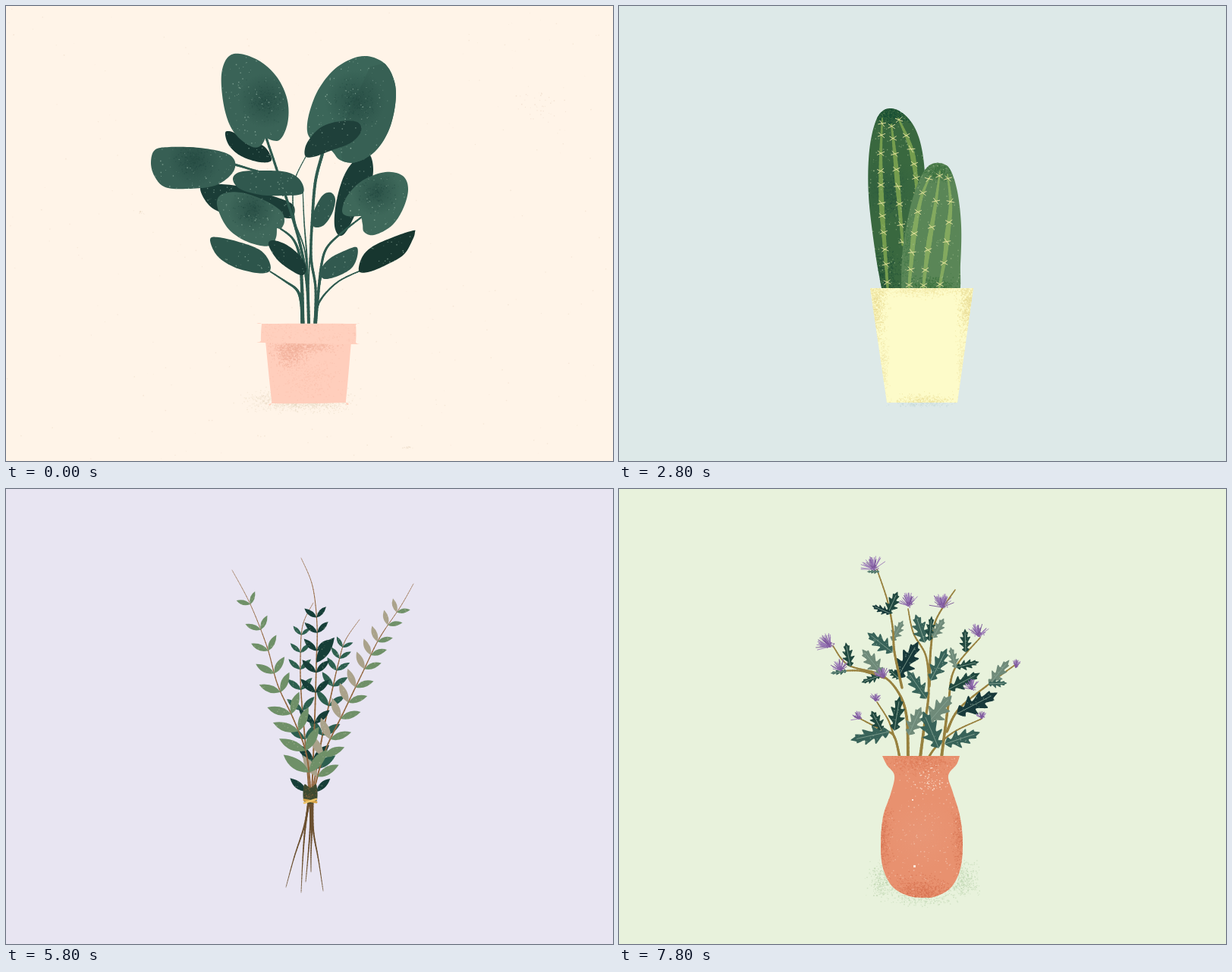
Write an HTML page with a canvas that moves like this. It is 800 by 600 pixels and loops after 8000 ms.

```html
<!DOCTYPE html>
<html lang="en">
<head>
<meta charset="utf-8">
<title>Potted plants</title>
<style>
html, body { margin: 0; width: 100%; height: 100%; overflow: hidden; }
canvas { display: block; }
</style>
</head>
<body>
<canvas id="stage" width="800" height="600"></canvas>
<script>
const ctx = document.getElementById('stage').getContext('2d');

let seed;
const rnd = () => {
  seed = (seed + 0x6D2B79F5) | 0;
  let t = Math.imul(seed ^ seed >>> 15, 1 | seed);
  t ^= t + Math.imul(t ^ t >>> 7, 61 | t);
  return ((t ^ t >>> 14) >>> 0) / 4294967296;
};
const bell = () => (rnd() + rnd() + rnd() - 1.5) / 1.5;
const mix = (a, b, t) => a + (b - a) * t;
const parse = s => s.split(' ').map(p => p.split(',').map(Number));

// Smooth curve through points; a doubled point makes a corner.
function trace(str, closed) {
  const p = parse(str), n = p.length, out = [];
  const at = i => closed ? p[(i + n) % n] : p[Math.max(0, Math.min(n - 1, i))];
  for (let i = 0; i < (closed ? n : n - 1); i++) {
    const [a, b, c, d] = [at(i - 1), at(i), at(i + 1), at(i + 2)];
    if (b[0] === c[0] && b[1] === c[1]) continue;
    for (let k = 0; k < 10; k++) {
      const t = k / 10;
      out.push([0, 1].map(j => b[j] + .5 * t * (c[j] - a[j] + t * (2 * a[j] - 5 * b[j] + 4 * c[j] - d[j]
        + t * (3 * (b[j] - c[j]) + d[j] - a[j])))));
    }
  }
  if (!closed) out.push(p[n - 1]);
  return out;
}

function fillPoly(pts, col) {
  ctx.beginPath();
  pts.forEach(q => ctx.lineTo(...q));
  ctx.closePath();
  ctx.fillStyle = col;
  ctx.fill();
}

function backdrop(col) {
  ctx.fillStyle = col;
  ctx.fillRect(0, 0, 800, 600);
}

function dot(x, y, s) { ctx.fillRect(x, y, s, s); }

function grain(x, y, rx, ry, n, col, alpha = .6) {
  ctx.globalAlpha = alpha;
  ctx.fillStyle = col;
  for (let i = 0; i < n; i++) dot(x + bell() * rx, y + bell() * ry, mix(.7, 1.5, rnd()));
  ctx.globalAlpha = 1;
}

function specks(x, y, w, h, n, col, alpha = .55) {
  ctx.globalAlpha = alpha;
  ctx.fillStyle = col;
  for (let i = 0; i < n; i++) dot(x + rnd() * w, y + rnd() * h, mix(.5, 1.6, rnd()));
  ctx.globalAlpha = 1;
}

function glow(x, y, r, col) {
  const g = ctx.createRadialGradient(x, y, 0, x, y, r);
  g.addColorStop(0, col);
  g.addColorStop(1, col + '00');
  ctx.globalAlpha = .55;
  ctx.fillStyle = g;
  ctx.fillRect(x - r, y - r, 2 * r, 2 * r);
  grain(x, y, r, r, r * 4, col, .35);
}

// Filled outline with speckles; inner() paints more inside it.
function shape(str, col, inner, light = '#a5c4b2', gap = 95) {
  const pts = trace(str, true), xs = pts.map(q => q[0]), ys = pts.map(q => q[1]);
  const x = Math.min(...xs), y = Math.min(...ys), w = Math.max(...xs) - x, h = Math.max(...ys) - y;
  fillPoly(pts, col);
  ctx.save();
  ctx.clip();
  if (inner) inner();
  if (light) specks(x, y, w, h, w * h / gap, light);
  ctx.restore();
}

function strokePts(pts, w0, w1, col) {
  ctx.strokeStyle = col;
  ctx.lineCap = 'round';
  for (let i = 1; i < pts.length; i++) {
    ctx.lineWidth = mix(w0, w1, i / pts.length);
    ctx.beginPath();
    ctx.moveTo(...pts[i - 1]);
    ctx.lineTo(...pts[i]);
    ctx.stroke();
  }
}
const stem = (str, w0, w1, col) => strokePts(trace(str), w0, w1, col);

function line(x1, y1, x2, y2, w, col) { strokePts([[x1, y1], [x2, y2]], w, w, col); }

function turn(deg, x, y, draw) {
  ctx.save();
  ctx.translate(x, y);
  ctx.rotate(deg * Math.PI / 180);
  ctx.translate(-x, -y);
  draw();
  ctx.restore();
}

function plant(k) {
  const green = '#2f5a4f', dark = '#1b3d37', deep = '#1c4039';
  const shade = (x, y, r) => () => glow(x, y, r, deep);
  backdrop('#fff4e8');
  specks(0, 0, 800, 600, 260, '#f3e3d2', .7);
  grain(700, 130, 45, 35, 40, '#eedccb', .7);
  grain(175, 272, 10, 5, 10, '#e8d5c2');
  grain(530, 582, 10, 3, 14, '#e8d5c2');
  grain(390, 520, 95, 20, 1500, '#e9dcc6', .5);

  shape('433,290 435,260 445,225 460,203 478,195 484,215 479,240 465,265 450,295 440,303', dark);
  shape('289,167 298,166 315,175 340,185 350,203 335,206 310,198 294,184', '#163631');
  shape('256,240 275,235 310,238 350,250 378,262 377,279 355,278 300,276 270,265', dark);
  stem('301,209 318,214 345,224 365,250', 3, 2, green);
  stem('343,174 360,225 378,280 390,325 397,370 399,419', 3, 4, green);
  stem('396,197 382,225 378,250 381,285 395,330 399,419', 1, 2, green);
  stem('417,195 408,230 404,275 402,330 408,372 407,419', 4, 3, green);
  stem('404,285 402,310 399,360 399,419', 1.5, 2, green);
  stem('391,240 393,285 397,340 399,419', 1, 2.5, green);
  stem('361,293 378,307 387,330 390,370 391,419', 2, 5, green);
  stem('348,350 368,363 383,374 389,390 391,419', 1.5, 5, green);
  stem('469,278 445,297 424,317 416,340 411,385 408,419', 2, 4, green);
  stem('416,355 412,375 408,405', 1.5, 2, green);

  shape('397,165 400,140 413,108 437,80 470,66 498,75 512,100 513,130 504,165 486,192 461,206 440,203 428,190 405,178',
    '#3b6659', () => {
      fillPoly(parse('480,80 520,70 520,210 445,215 438,170'), '#376054');
      glow(460, 125, 40, deep);
    });
  shape('394,197 397,180 415,160 440,152 463,153 468,165 455,180 430,190 405,199', '#1f403a');
  turn(-6 * k, 342, 174, () =>
    shape('342,174 342,174 360,177 371,155 371,125 358,95 335,73 308,63 292,68 284,90 286,125 294,155 307,174 325,186 336,184',
      '#3a6357', shade(342, 125, 36)));
  shape('191,207 196,190 215,186 255,187 290,194 302,206 297,222 275,237 240,241 210,239 196,225', '#375f54', shade(248, 203, 35));
  shape('299,228 308,219 335,217 370,219 388,230 391,247 365,250 335,249 308,241', '#30584e');
  shape('278,262 285,248 310,246 340,256 362,270 367,283 363,293 357,293 357,293 356,305 350,315 335,316 310,307 290,290',
    '#3e675a', shade(325, 268, 32));
  shape('269,308 280,305 310,312 335,322 347,337 347,350 330,352 300,344 278,329', '#2d554b');
  shape('346,315 352,309 370,315 388,330 396,345 391,355 378,350 358,335', dark);
  shape('404,288 406,270 417,250 428,246 434,255 430,273 420,288 410,292', '#30584e');
  shape('443,270 450,250 470,230 500,219 523,224 530,242 523,268 508,290 485,302 472,298 470,288 468,277 468,277 450,277',
    '#3e685a', shade(488, 245, 32));
  shape('415,356 416,345 428,332 448,322 462,318 463,330 456,345 440,355 422,360', '#31594f');
  turn(6 * k, 410, 395, () => {
    stem('467,349 440,362 421,379 410,395', 1.5, 2.5, green);
    shape('465,349 470,330 485,316 515,303 537,296 539,298 536,308 524,328 500,342 477,351', '#17362f');
  });
  stem('412,392 408,405 407,419', 2.5, 3, green);

  shape('342,442 342,442 455,442 455,442 448,519 444,523 354,524 350,519', '#ffcebc', () => {
    grain(395, 447, 62, 14, 900, '#f3b39d', .5);
    grain(374, 458, 32, 26, 700, '#f2ae98', .5);
    grain(400, 490, 60, 40, 400, '#fbbfab', .5);
  }, null);
  shape('337,420 340,419 457,419 461,421 461,443 457,446 339,444 336,441', '#ffd0be', null, '#fac2ae', 14);
}

function spine(x, y) {
  const a = bell() * .5;
  for (const b of [a - .45, a + .65]) {
    const c = Math.cos(b) * 5, s = Math.sin(b) * 5;
    line(x - c, y - s, x + c, y + s, .9, '#efe8a4');
  }
}

function rib(str, n, col) {
  const pts = trace(str), half = pts.length >> 1;
  strokePts(pts.slice(0, half + 1), 1.5, 7, col);
  strokePts(pts.slice(half), 7, 3, col);
  for (let i = 0; i < n; i++) {
    const q = pts[Math.round(mix(.04, .95, i / (n - 1)) * (pts.length - 1))];
    spine(q[0], q[1]);
  }
}

function cactus(k) {
  backdrop('#dde9e8');
  grain(398, 523, 56, 7, 180, '#c3d7d6');
  shape('346,372 337,320 329,250 330,190 340,148 356,135 376,143 392,165 401,200 404,250 402,320 396,385 350,385', '#39683f', () => {
    grain(360, 142, 42, 22, 900, '#174f36');
    grain(345, 360, 30, 55, 900, '#1f4d38');
    grain(360, 250, 20, 40, 300, '#234f3c');
    glow(348, 240, 45, '#2b5a3e');
    rib('347,148 345,200 346,260 350,315 354,372', 11, '#759d4e');
    rib('359,156 364,200 369,255 374,315', 8, '#759d4e');
    rib('368,148 383,182 390,215 393,250', 6, '#759d4e');
  }, '#a9c492', 70);
  turn(-5.6 * k, 412, 396, () =>
    shape('372,372 374,320 384,265 396,229 408,211 422,207 436,215 446,245 451,290 450,340 446,385 410,400 373,388', '#5a8657', () => {
      grain(422, 216, 36, 20, 700, '#3b713f');
      grain(412, 372, 50, 22, 900, '#39703b');
      grain(380, 320, 14, 70, 350, '#3f7546', .45);
      rib('410,224 398,254 389,300 385,340 382,372', 7, '#83a95f');
      rib('423,218 417,262 409,310 404,345 401,372', 6, '#83a95f');
      rib('433,222 437,262 433,300 429,335 422,372', 6, '#83a95f');
    }, '#a9c492', 85));
  shape('331,372 331,372 467,372 467,372 446,523 446,523 353,523 353,523', '#fdfbc9', () => {
    grain(337, 395, 22, 62, 1100, '#eadd95');
    grain(461, 395, 20, 62, 1100, '#eadd95');
    grain(400, 372, 80, 16, 800, '#f0e4a0');
    grain(400, 526, 62, 20, 900, '#ecdf98');
    grain(348, 475, 10, 65, 300, '#f0e6a8');
    grain(452, 475, 10, 65, 300, '#f0e6a8');
  }, null);
}

function lens(x, y, a, len, col) {
  ctx.save();
  ctx.translate(x, y);
  ctx.rotate(a);
  ctx.beginPath();
  ctx.moveTo(0, 0);
  ctx.quadraticCurveTo(len * .5, -len * .36, len, 0);
  ctx.quadraticCurveTo(len * .42, len * .3, 0, 0);
  ctx.fillStyle = col;
  ctx.fill();
  ctx.clip();
  specks(0, -len * .2, len, len * .4, len / 3, '#c9d2b0', .35);
  ctx.restore();
}

function sprig(str, left, right, n, t0, t1, l0, l1) {
  const pts = trace(str), last = pts.length - 1;
  strokePts(pts, .5, 2.2, '#93673f');
  for (let i = 0; i < n; i++) {
    const u = i / (n - 1), j = Math.round(mix(t0, t1, u) * last), q = pts[j], r = pts[Math.max(0, j - 2)];
    const a = Math.atan2(r[1] - q[1], r[0] - q[0]), len = mix(l0, l1, u);
    lens(q[0], q[1], a - .85, len, left);
    lens(q[0], q[1], a + .8, len * .95, right);
  }
}

function bouquet(k) {
  const sage = '#6f9068', pine = '#2d5f4f', night = '#163e38', sand = '#aaa28b';
  backdrop('#e8e5f2');
  for (const s of ['400,410 393,445 380,485 369,525', '399,410 394,450 391,490 389,532', '401,410 401,445 398,485 395,518',
    '402,410 403,445 402,480 402,505', '404,410 405,450 412,490 418,530']) stem(s, 3, .5, '#6b5030');
  sprig('405,150 391,180 388,225 389,270 394,330 400,405', pine, pine, 7, .25, .9, 16, 30);
  sprig('466,172 447,200 438,230 430,265 417,325 403,405', pine, pine, 7, .25, .9, 16, 32);
  sprig('389,91 404,128 410,180 409,230 407,300 403,405', night, night, 7, .36, .9, 20, 30);
  lens(409, 229, -.95, 41, night);
  sprig('537,125 520,155 492,197 470,242 446,292 420,347 404,405', sand, sage, 11, .2, .92, 19, 34);
  turn(-8.3 * k, 402, 400, () =>
    sprig('298,107 322,152 344,208 358,258 380,306 396,350 402,405', sage, sage, 9, .17, .9, 19, 41));
  lens(396, 399, -2.45, 28, night);
  lens(409, 399, -.75, 25, night);
  shape('393,390 401,394 409,390 409,412 393,412', '#3d4a30', null, '#93673f', 6);
  line(393, 410, 409, 413, 3, '#d9a548');
  line(393, 414, 409, 409, 2.5, '#eec56b');
}

function bands(x0, x1, y0, y1, w, col) {
  for (let y = y0; y < y1; y += 7.5) {
    const x = mix(x0, x1, (y - y0) / (y1 - y0)), l = w * mix(.5, 1, rnd());
    line(x - l, y + bell(), x + w * mix(-.1, .2, rnd()), y + bell(), 1, col);
    if (rnd() > .25) line(x + w * .3, y - 2 + bell(), x + l, y - 2 + bell(), 1, col);
  }
}

function snake(k) {
  const dark = '#2c604e', mid = '#4f8264', pale = '#87a673', cream = '#d5dfae';
  backdrop('#e9e2d0');
  ctx.fillStyle = '#fff';
  ctx.fillRect(0, 0, 3, 21);
  grain(334, 535, 24, 20, 260, '#cfc9a9');
  grain(463, 535, 22, 18, 200, '#d6cdb2');
  const back = (s, x, y) => shape(s, dark, () => glow(x, y, 35, '#1c5143'), '#5f9079', 32);
  back('345,222 345,222 357,245 365,280 368,395 340,395 340,280', 352, 270);
  back('414,185 414,185 424,215 428,260 430,395 385,395 388,255 398,215', 410, 240);
  back('475,231 475,231 474,265 466,300 460,395 432,395 440,300 442,265 455,243', 455, 265);
  back('294,320 294,320 310,330 320,350 325,395 318,388 304,365 297,345', 310, 350);
  back('511,303 511,303 510,330 502,360 485,395 475,395 485,340 495,320', 500, 330);
  const middle = (s, x0, x1, y, w) => shape(s, mid, () => bands(x0, x1, y, 388, w, '#41765b'), '#75a083', 45);
  middle('376,198 376,198 385,215 392,260 396,310 398,395 362,395 357,320 364,260 369,225', 377, 378, 230, 13);
  middle('436,214 436,214 441,260 446,310 445,395 412,395 416,300 423,245', 434, 430, 245, 11);
  middle('307,300 307,300 322,315 333,345 345,395 320,395 312,350', 318, 332, 330, 9);
  middle('490,287 490,287 494,310 490,350 482,395 460,395 466,340 477,305', 486, 472, 315, 9);
  const front = (s, x0, x1, w, y = 286) => shape(s, pale, () => {
    grain(x1, 392, 30, 55, 500, '#6e9560', .5);
    bands(x0, x1, y, 386, w, cream);
  }, '#a9c08c', 60);
  turn(4.5 * k, 360, 392, () =>
    front('320,260 320,260 345,278 363,310 371,350 373,395 344,395 334,345 326,300', 337, 359, 11));
  front('405,248 405,248 416,280 420,320 415,365 411,395 391,395 387,350 389,300 397,270', 405, 402, 11, 278);
  turn(4.5 * k, 446, 392, () =>
    front('482,274 482,274 481,315 473,355 463,395 428,395 434,345 447,305 465,285', 470, 446, 11));
  shape('318,391 318,391 482,391 482,391 482,403 482,403 318,403 318,403', '#b96b4e', null, '#8f7a5f', 6);
  shape('310,404 314,401 400,402 486,401 490,404 479,455 462,534 457,538 345,538 339,533 322,455', '#fdf7f0', () => {
    glow(375, 480, 65, '#ffffff');
    glow(440, 460, 50, '#ffffff');
    grain(325, 470, 20, 90, 600, '#f6e7d6', .5);
    grain(475, 470, 16, 90, 500, '#f6e7d6', .5);
    grain(400, 538, 75, 14, 500, '#f6e7d6', .5);
    grain(385, 425, 85, 30, 500, '#faeadd', .5);
  }, null);
}

function lobed(x, y, tx, ty, w, col) {
  const dx = tx - x, dy = ty - y, len = Math.hypot(dx, dy);
  const side = [[0, .08], [.12, .6], [.2, .3], [.4, 1], [.42, .4], [.66, .85], [.66, .35], [.86, .5], [.88, .28], [1, .05]];
  const put = (t, s) => (x + dx * t - dy / len * s * w).toFixed(1) + ',' + (y + dy * t + dx / len * s * w).toFixed(1);
  const pts = [...side.map(([t, s]) => put(t, s)), ...side.slice().reverse().map(([t, s]) => put(t, -s))];
  shape(pts.join(' '), col, () => line(x, y, x + dx * .85, y + dy * .85, .8, '#8ba797'), '#9db8a6', 45);
}

function flower(x, y, r, a = -1.57) {
  for (let i = 0; i < r * 2.2; i++) {
    const b = a + bell() * 1.7, l = r * mix(.65, 1.15, rnd());
    line(x, y, x + Math.cos(b) * l, y + Math.sin(b) * l, .9, i % 3 ? '#9a79b8' : '#765296');
  }
  grain(x, y - r * .2, r * .5, r * .35, r * 3, '#80599e', .8);
}

function vase(k) {
  const sway = (k - .5) * 5, mid = '#386359', dark = '#20483f', deep = '#17393a', gray = '#6f8a79', wood = '#98813f';
  backdrop('#e8f2dc');
  grain(350, 515, 30, 34, 420, '#b4d0a6', .5);
  grain(453, 515, 30, 34, 420, '#b4d0a6', .5);
  grain(400, 540, 65, 14, 240, '#b9d3ab', .5);
  const twig = (s, w = 3.5) => stem(s, 1.5, w, wood);
  twig('282,207 302,232 345,245 368,268 379,300 381,354', 4);
  twig('293,240 320,240 350,249');
  twig('381,158 388,190 405,222 408,270 402,315 397,354', 4);
  twig('443,133 418,172 411,210 409,260', 3.5);
  twig('476,196 442,238 434,285 425,354', 4);
  twig('522,232 488,257 448,290 432,320');
  twig('478,303 442,320 418,340 408,354', 3);
  twig('318,303 345,317 362,325 370,354');
  twig('340,281 355,305 363,328', 2.5);
  const leaves = [
    [360, 215, 328, 190, 11, mid], [346, 243, 321, 212, 11, gray],
    [360, 200, 374, 174, 8, gray], [411, 252, 432, 211, 11, mid], [405, 276, 380, 240, 11, mid],
    [403, 202, 391, 166, 11, mid], [409, 200, 412, 168, 7, dark], [414, 196, 428, 171, 8, gray],
    [457, 215, 456, 185, 8, dark], [305, 234, 299, 203, 8, dark], [444, 236, 437, 209, 7, gray],
    [445, 235, 474, 228, 7, dark], [435, 264, 475, 243, 10, dark], [446, 296, 498, 269, 14, deep],
    [488, 258, 514, 226, 9, gray], [487, 257, 511, 256, 6, mid], [344, 246, 320, 255, 6, dark],
    [367, 249, 394, 202, 14, deep], [369, 250, 356, 238, 6, dark], [363, 318, 370, 274, 11, dark],
    [346, 318, 333, 293, 9, dark], [356, 320, 306, 331, 12, mid], [382, 324, 398, 288, 11, gray],
    [406, 310, 438, 273, 14, gray], [421, 341, 401, 294, 14, mid], [430, 336, 475, 321, 12, mid],
    [300, 240, 279, 243, 4, mid]
  ];
  leaves.forEach(l => lobed(...l));
  turn(sway, 362, 210, () => {
    twig('340,106 354,148 361,185 363,215 373,262');
    lobed(354, 165, 367, 136, 9, dark);
    lobed(357, 164, 334, 154, 6, deep);
    lobed(343, 109, 327, 109, 3, mid);
    flower(336, 106, 16, -2);
  });
  flower(382, 154, 15, -1.7);
  turn(sway, 411, 200, () => flower(426, 156, 16, -1.8));
  flower(474, 194, 15);
  flower(278, 208, 16, -2.4);
  flower(292, 239, 13, -1.8);
  flower(348, 248, 12, -1.9);
  flower(338, 279, 9);
  flower(316, 303, 9, -1.9);
  flower(465, 264, 12, -1.8);
  flower(478, 302, 8);
  flower(523, 234, 8, -1.4);

  shape('347,352 347,352 449,352 449,352 445,363 434,378 440,400 449,430 453,465 450,500 438,525 418,537 400,539 380,536 360,524 348,500 345,470 348,432 358,402 363,378 353,364',
    '#e8916f', () => {
      grain(345, 455, 20, 90, 900, '#d67350', .5);
      grain(453, 455, 20, 90, 900, '#d67350', .5);
      grain(400, 540, 60, 40, 1600, '#d66f4c', .5);
      grain(398, 358, 60, 24, 800, '#de7a57', .5);
      glow(398, 455, 48, '#e99a7b');
      grain(410, 385, 30, 24, 70, '#fbe2d2', .9);
      ctx.fillStyle = '#fae6d8';
      dot(388, 496, 3);
      dot(386, 409, 2);
    }, '#f9d6c4', 75);
}

const STEP = 200;
const there = [0, .5, 1, .5, 0];
const scenes = [
  [plant, there, 10], [cactus, there, 10], [bouquet, [0, .35, 1, .35, 0], 10], [snake, [0, 1, 0], 6], [vase, there, 4]
];
const start = performance.now();
let shown = -1;

function frame() {
  const step = Math.floor((performance.now() - start) / STEP) % 40;
  if (step !== shown) {
    shown = step;
    let i = step, s = 0;
    while (i >= scenes[s][2]) i -= scenes[s++][2];
    const [draw, poses] = scenes[s];
    seed = 7;
    draw(poses[i % poses.length]);
  }
  requestAnimationFrame(frame);
}
frame();
</script>
</body>
</html>
```
